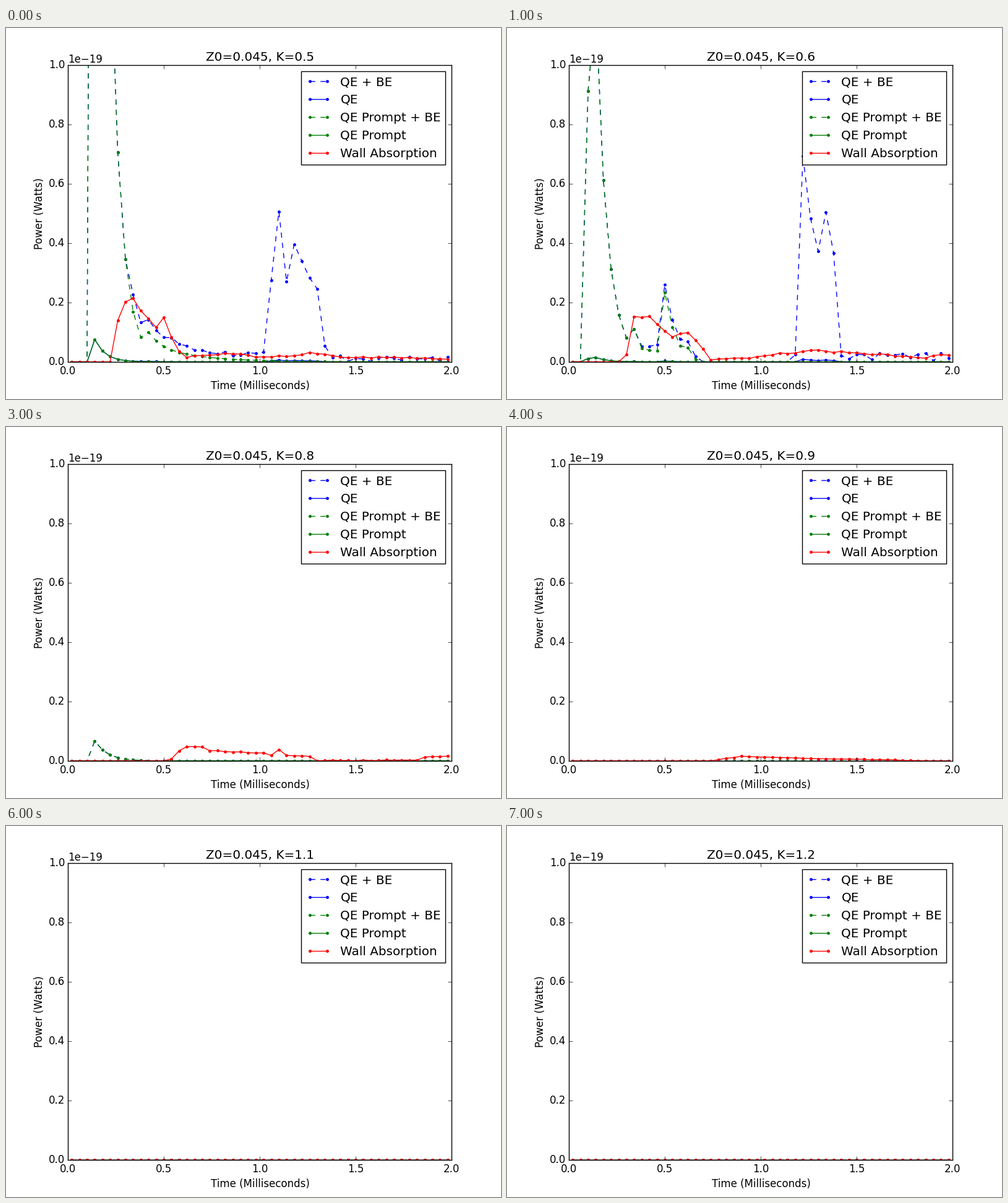
Write a matplotlib script that moves like this. It is 800 px wide and 600 px high and loops after 8 s.

```python
import matplotlib.pyplot as plt
import numpy as np
from matplotlib.animation import FuncAnimation

plt.style.use("classic")
plt.rcParams.update({"font.family": "DejaVu Sans", "ytick.major.pad": 3.4})

UNIT = 1e-22        # levels below are in thousandths of 1e-19 W
EFFICIENCY = 0.0125  # plain signal as a share of the boosted one
bins = np.arange(50)
time = 0.02 + 0.04 * bins


def pulse(start, peak, decay):
    """Sudden peak that fades by a constant factor per bin."""
    return np.where(bins < start, 0, peak * decay ** np.maximum(bins - start, 0))


def path(*points):
    """Straight pieces through (bin, level) points, zero outside them."""
    if not points:
        return np.zeros(len(bins))
    return np.interp(bins, *zip(*points), left=0, right=0)


def flicker(start, mean, seed):
    """Random low-level signal from one bin onwards."""
    noise = np.random.default_rng(seed).uniform(0, 2 * mean, len(bins))
    return np.where(bins < start, 0, noise)


def shake(level, size, seed):
    """Unsteady version of a curve; its silent bins stay silent."""
    noise = np.random.default_rng(seed).uniform(-size, size, len(bins))
    return np.where(level > 0, np.maximum(level + noise, 0), 0)


def scene(prompt=path(), late=path(), wall=path()):
    total = prompt + late
    return total, EFFICIENCY * total, prompt, EFFICIENCY * prompt, wall


scenes = [
    # K = 0.5
    scene(
        pulse(3, 6000, 0.49) + pulse(10, 60, 0.84),
        pulse(8, 58, 0.85) + flicker(13, 10, 1)
        + path((25, 10), (26, 257), (27, 496), (28, 263), (29, 373),
               (32, 231), (33, 36)),
        shake(path((5, 0), (6, 142), (7, 206), (8, 216), (9, 171), (11, 119),
                   (12, 150), (13, 81), (14, 36), (15, 14), (20, 30),
                   (25, 14), (31, 29), (36, 14), (49, 13)), 4, 2)),
    # K = 0.6
    scene(
        pulse(3, 1200, 0.51) + path((1, 0), (2, 912), (3, 0))
        + path((8, 70), (9, 25), (11, 32), (12, 230), (13, 115), (14, 54),
               (15, 48), (16, 9)),
        path((8, 0), (12, 27), (15, 20), (17, 0)) + flicker(28, 17, 3)
        + path((29, 0), (30, 680), (31, 480), (32, 350), (33, 473),
               (34, 360), (35, 0)),
        shake(path((6, 0), (7, 27), (8, 150), (10, 150), (13, 82), (15, 100),
                   (18, 9), (21, 9), (31, 38), (40, 25), (46, 15), (49, 24)),
              4, 4)),
    # K = 0.7
    scene(
        pulse(3, 500, 0.45) + path((1, 0), (2, 390), (3, 19), (6, 69), (9, 9)),
        path((9, 0), (12, 23), (14, 23), (15, 0)) + flicker(37, 10, 5)
        + path((39, 0), (40, 432), (41, 202), (42, 332), (43, 323), (44, 80),
               (45, 112), (47, 72), (48, 175), (49, 217)),
        shake(path((9, 0), (10, 77), (12, 94), (14, 66), (18, 48), (20, 54),
                   (22, 35), (23, 6), (33, 8), (34, 31), (36, 52), (41, 27),
                   (47, 18), (49, 28)), 3, 6)),
    # K = 0.8
    scene(
        pulse(3, 67, 0.55),
        wall=shake(path((12, 0), (13, 7), (14, 34), (15, 48), (17, 46),
                        (18, 34), (25, 27), (26, 19), (27, 37), (28, 18),
                        (31, 16), (32, 2), (45, 2), (46, 14), (49, 15)),
                   1.5, 7)),
    # K = 0.9
    scene(wall=shake(path((18, 0), (22, 16), (30, 9), (45, 1)), 1, 8)),
    # K = 1.0
    scene(wall=path((39, 0), (40, 2), (41, 0), (47, 0), (48, 2), (49, 2))),
    # K = 1.1 and 1.2 stay silent
    scene(),
    scene(),
]

fig = plt.figure(figsize=(8, 6), dpi=100, facecolor="white")
ax = fig.add_axes([0.125, 0.1, 0.775, 0.8])
styles = [("b.--", "QE + BE"), ("b.-", "QE"), ("g.--", "QE Prompt + BE"),
          ("g.-", "QE Prompt"), ("r.-", "Wall Absorption")]
lines = [ax.plot(time, 0 * time, fmt, label=name)[0] for fmt, name in styles]
ax.set_xlim(0, 2)
ax.set_ylim(0, 1e-19)
ax.set_xticks(np.arange(5) * 0.5)
ax.set_yticks(np.arange(6) * 2e-20)
ax.set_xlabel("Time (Milliseconds)", x=0.501)
ax.set_ylabel("Power (Watts)", labelpad=4.3)
legend = ax.legend(loc="upper right", framealpha=1, handletextpad=0.7)
for text in legend.get_texts():
    text.set_x(1)
title = ax.set_title("", x=0.5013)


def draw(i):
    for line, levels in zip(lines, scenes[i]):
        line.set_ydata(levels * UNIT)
    title.set_text(f"Z0=0.045, K={0.5 + 0.1 * i:.1f}")
    return lines + [title]


anim = FuncAnimation(fig, draw, frames=len(scenes), interval=1000,
                     repeat=True, repeat_delay=0)
plt.show()
```
